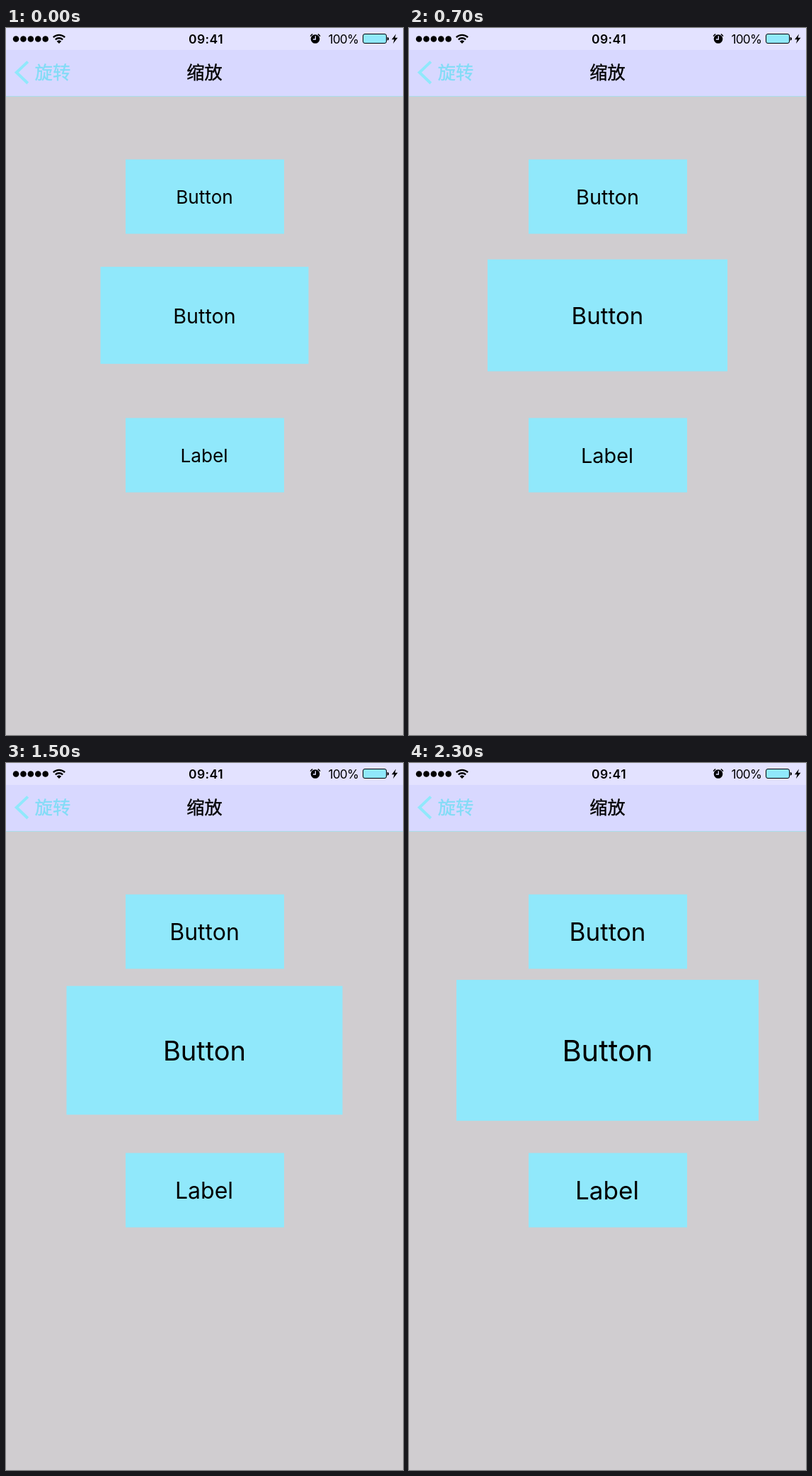
An HTML page that plays this animation: 561x998 px, repeating every 2.4 s.

```html
<!DOCTYPE html>
<html lang="zh-CN">
<head>
<meta charset="utf-8">
<title>缩放</title>
<style>
  html, body { margin: 0; width: 100%; height: 100%; overflow: hidden; background: #d0cdd0; }
  svg { display: block; width: 561px; height: 998px; }
  text { font-family: Inter, Roboto, sans-serif; text-anchor: middle; }
  .cjk { font-family: "Noto Sans CJK SC", "Noto Sans CJK", sans-serif; font-size: 25.2px; }
  .box { fill: #90e8fb; }
  .line { fill: none; stroke: #000; }
</style>
</head>
<body>
<svg viewBox="0 0 561 998">
  <rect width="561" height="31" fill="#e3e2ff"/>
  <rect y="31" width="561" height="65" fill="#d8d8ff"/>
  <rect y="96" width="561" height="1" fill="#a9dcea"/>

  <g id="signal"></g>
  <g class="line" stroke-width="2.3">
    <path d="M66.8 13.2A12 12 0 0 1 83.2 13.2"/>
    <path d="M69.8 16.3A7.6 7.6 0 0 1 80.2 16.3"/>
  </g>
  <path d="M75 22L71.7 18.7A4.8 4.8 0 0 1 78.3 18.7Z"/>
  <text x="282.5" y="21.8" font-size="17.5" font-weight="600" letter-spacing=".45">09:41</text>

  <circle cx="437" cy="15.5" r="6.3"/>
  <path class="line" d="M430.2 11.6A8 8 0 0 1 433.2 8.6M443.8 11.6A8 8 0 0 0 440.8 8.6" stroke-width="1.6"/>
  <path d="M437.3 11.3V16H433.8" fill="none" stroke="#e3e2ff" stroke-width="1.4"/>
  <text x="476.8" y="21.8" font-size="17.2" letter-spacing="-.8">100%</text>
  <rect class="box" x="504.5" y="8.5" width="33" height="13" rx="2.5" stroke="#000"/>
  <path d="M538.6 12.7Q541 13 541 15.2T538.6 17.8Z"/>
  <path d="M551 8.5L545 16.2H548.6L547 22L553.5 13.8H549.6Z"/>

  <path d="M30.8 47.6L14.8 62.8L30.8 78" fill="none" stroke="#90e8fb" stroke-width="4"/>
  <text class="cjk" x="66" y="72" fill="#82dcf6" stroke="#82dcf6" stroke-width=".4">旋转</text>
  <text class="cjk" x="280.5" y="71.8" stroke="#000" stroke-width=".35">缩放</text>

  <rect class="box" x="169" y="185.5" width="224" height="105"/>
  <rect class="box" id="zoom"/>
  <rect class="box" x="169" y="550.5" width="224" height="105"/>
  <text id="top" x="280.5">Button</text>
  <text id="mid" x="280.5">Button</text>
  <text id="low" x="280">Label</text>
</svg>
<script>
const LOOP = 2400, STEP = 100, CX = 280.5;
// [ms, width of the zooming box]
const widths = [[0, 294], [400, 322], [700, 339], [1200, 373], [1500, 390], [1900, 418], [2050, 427], [2400, 427]];
const $ = id => document.getElementById(id);

function set(el, attrs) {
  for (const key in attrs) el.setAttribute(key, attrs[key]);
}

function widthAt(t) {
  const i = widths.findIndex(([time]) => time > t);
  const [t0, w0] = widths[i - 1], [t1, w1] = widths[i];
  return w0 + (w1 - w0) * (t - t0) / (t1 - t0);
}

// Keeps the capitals centred on y while the size grows.
function setText(id, y, size) {
  set($(id), { y: y + size * 0.3635, "font-size": size });
}

function draw(now) {
  const t = Math.floor(now % LOOP / STEP) * STEP;
  const w = widthAt(t), h = w * 0.466;
  set($("zoom"), { x: CX - w / 2, y: 405.6 - h / 2, width: w, height: h });
  const size = 26.2 + 8.9 * t / 2300;
  setText("top", 238, size);
  setText("mid", 406.2, w * 0.0975);
  setText("low", 603.2, size);
}

for (let i = 0; i < 5; i++) {
  const dot = document.createElementNS("http://www.w3.org/2000/svg", "circle");
  set(dot, { cx: 14.1 + i * 10.4, cy: 15.5, r: 4.3 });
  $("signal").append(dot);
}

const start = performance.now();
function tick() {
  draw(performance.now() - start);
  requestAnimationFrame(tick);
}
tick();
</script>
</body>
</html>
```
